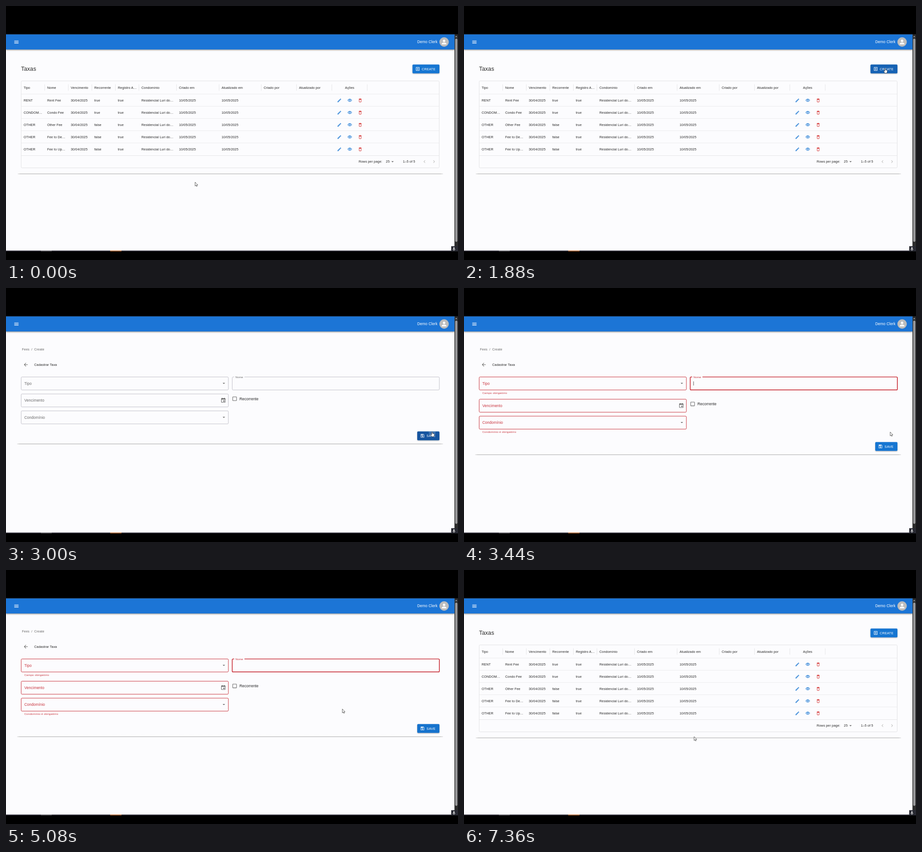
Recreate the animation shown at these times as an HTML page. Size 998 by 561 pixels, loop 7400 ms.

```html
<!DOCTYPE html>
<html lang="pt">
<head>
<meta charset="utf-8">
<title>Taxas</title>
<style>
html, body { margin: 0; width: 100%; height: 100%; overflow: hidden; background: #000; }
svg { display: block; }
text { font-family: "Liberation Sans", Arial, sans-serif; letter-spacing: .01em; white-space: pre; }
</style>
</head>
<body>
<svg id="stage" width="998" height="561" viewBox="0 0 998 561"></svg>
<script>
const LOOP = 7400, BLUE = '#1976d2', DARK = '#1559a8', RED = '#c9323b', INK = '#262626', GREY = '#696969';

const ICONS = {
  menu: 'M3 18h18v-2H3zm0-5h18v-2H3zm0-7v2h18V6z',
  person: 'M12 12a4 4 0 1 0 0-8 4 4 0 0 0 0 8zm0 2c-2.67 0-8 1.34-8 4v2h16v-2c0-2.66-5.33-4-8-4z',
  add: 'M19 3H5a2 2 0 0 0-2 2v14a2 2 0 0 0 2 2h14a2 2 0 0 0 2-2V5a2 2 0 0 0-2-2m0 16H5V5h14zm-8-2h2v-4h4v-2h-4V7h-2v4H7v2h4z',
  edit: 'm14.06 9.02.92.92L5.92 19H5v-.92zM17.66 3c-.25 0-.51.1-.7.29l-1.83 1.83 3.75 3.75 1.83-1.83c.39-.39.39-1.02 0-1.41l-2.34-2.34c-.2-.2-.45-.29-.71-.29m-3.6 3.19L3 17.25V21h3.75L17.81 9.94z',
  view: 'M12 6c3.79 0 7.17 2.13 8.82 5.5C19.17 14.87 15.79 17 12 17s-7.17-2.13-8.82-5.5C4.83 8.13 8.21 6 12 6m0-2C7 4 2.73 7.11 1 11.5 2.73 15.89 7 19 12 19s9.27-3.11 11-7.5C21.27 7.11 17 4 12 4m0 5a2.5 2.5 0 0 1 0 5 2.5 2.5 0 0 1 0-5m0-2a4.5 4.5 0 0 0 0 9 4.5 4.5 0 0 0 0-9',
  trash: 'M6 19c0 1.1.9 2 2 2h8c1.1 0 2-.9 2-2V7H6zM8 9h8v10H8zm7.5-5-1-1h-5l-1 1H5v2h14V4z',
  save: 'M17 3H5a2 2 0 0 0-2 2v14a2 2 0 0 0 2 2h14a2 2 0 0 0 2-2V7zm2 16H5V5h11.17L19 7.83zm-7-7a3 3 0 0 0 0 6 3 3 0 0 0 0-6M6 6h9v4H6z',
  event: 'M17 12h-5v5h5zM16 1v2H8V1H6v2H5a2 2 0 0 0-2 2v14a2 2 0 0 0 2 2h14a2 2 0 0 0 2-2V5a2 2 0 0 0-2-2h-1V1zm3 18H5V8h14z',
  box: 'M19 5v14H5V5h14m0-2H5a2 2 0 0 0-2 2v14a2 2 0 0 0 2 2h14a2 2 0 0 0 2-2V5a2 2 0 0 0-2-2z',
  back: 'M20 11H7.83l5.59-5.59L12 4l-8 8 8 8 1.41-1.41L7.83 13H20z',
  drop: 'M7 9.5l5 5 5-5z',
  left: 'M15.41 7.41 14 6l-6 6 6 6 1.41-1.41L10.83 12z',
  right: 'M10 6 8.59 7.41 13.17 12l-4.58 4.59L10 18l6-6z',
  mic: 'M12 14a3 3 0 0 0 3-3V5a3 3 0 0 0-6 0v6a3 3 0 0 0 3 3zm5-3a5 5 0 0 1-10 0H5a7 7 0 0 0 6 6.9V21h2v-3.1A7 7 0 0 0 19 11z'
};

const rect = (x, y, w, h, fill, extra = '') =>
  `<rect x="${x}" y="${y}" width="${w}" height="${h}" fill="${fill}" ${extra}/>`;
const line = (x1, y1, x2, y2, color) => `<path d="M${x1} ${y1}L${x2} ${y2}" stroke="${color}"/>`;
// Text is placed by the vertical middle of its capitals.
const text = (x, cy, str, size = 7.28, fill = INK, extra = '') =>
  `<text x="${x}" y="${cy + size * .36}" font-size="${size}" fill="${fill}" ${extra}>${str}</text>`;
const icon = (name, cx, cy, size, fill) =>
  `<path d="${ICONS[name]}" fill="${fill}" fill-rule="evenodd" transform="translate(${cx - size / 2} ${cy - size / 2}) scale(${size / 24})"/>`;

const button = (id, x, y, w, label, glyph) => `
  <clipPath id="${id}Clip"><rect x="${x}" y="${y}" width="${w}" height="19.5" rx="2"/></clipPath>
  ${rect(x, y, w, 19.5, BLUE, `id="${id}" rx="2" filter="url(#soft)"`)}
  ${icon(glyph, x + 11.5, y + 9.7, 10.4, '#fff')}
  ${text(x + 20.6, y + 9.7, label, 7.28, '#fff', 'style="letter-spacing:.029em"')}
  <circle id="${id}Ripple" fill="#fff" opacity="0" clip-path="url(#${id}Clip)"/>`;

const divider = (x, y) => rect(x, y, 965 - x, 1, 'url(#fade)');

function listPage() {
  const columns = [[39, 'Tipo'], [91, 'Nome'], [143, 'Vencimento'], [195, 'Recorrente'], [247, 'Registro A…'],
    [299, 'Condomínio'], [382, 'Criado em'], [476, 'Atualizado em'], [569, 'Criado por'], [647, 'Atualizado por'], [748.5, 'Ações']];
  const rows = [['RENT', 'Rent Fee', true], ['CONDOM…', 'Condo Fee', true], ['OTHER', 'Other Fee', false],
    ['OTHER', 'Fee to De…', false], ['OTHER', 'Fee to Up…', false]];
  const edges = [85.5, 137.5, 189.5, 241.5, 293.5, 376.5, 470.5, 563.5, 641.5, 719.5, 797.5];
  let out = text(33.3, 138.6, 'Taxas', 12.5) + button('create', 897.5, 129.3, 59.5, 'CREATE', 'add')
    + rect(33.5, 165.5, 923, 192, 'none', 'rx="2" stroke="#e3e3e5"');
  for (const [x, label] of columns) out += text(x, 180, label);
  for (const x of edges) out += line(x, 173, x, 187, '#e6e6e8');
  rows.forEach(([type, name, recurring], i) => {
    const y = 208.5 + 27 * i;
    const cells = [type, name, '30/04/2025', recurring, true, 'Residencial Luri do…', '10/05/2025', '10/05/2025'];
    out += line(34, y - 14, 956, y - 14, '#ececee');
    cells.forEach((cell, c) => out += text(columns[c][0], y, cell));
    out += icon('edit', 736, y, 10.4, BLUE) + icon('view', 759, y, 10.4, BLUE) + icon('trash', 782, y, 10.4, '#d32f2f');
  });
  return out + line(34, 330.5, 956, 330.5, '#e6e6e8')
    + text(778.7, 343.5, 'Rows per page:') + text(838.8, 343.5, '25') + icon('drop', 853.5, 344, 12.5, GREY)
    + text(876.6, 343.5, '1–5 of 5') + icon('left', 924, 343.7, 12.5, '#bdbdbd') + icon('right', 945, 343.7, 12.5, '#bdbdbd')
    + divider(26, 370.3);
}

function formPage(id, error) {
  const shift = error ? 11.6 : 0, tone = error ? RED : GREY, border = error ? RED : '#c1c0c8';
  const field = (y, label, glyph) => rect(33.5, y, 457.5, 28.7, 'none', `rx="2" stroke="${border}"`)
    + text(40.4, y + 14.4, label, 8.32, tone)
    + icon(glyph, glyph === 'drop' ? 481 : 479.8, y + 14.3, 12.5, '#666');
  const helper = (y, str) => text(40.4, y, str, 6.24, RED, 'style="letter-spacing:.033em"');
  return text(35.3, 135.7, 'Fees', 7.28, GREY) + text(56, 135.7, '/', 7.28, GREY) + text(62.3, 135.7, 'Create', 7.28, GREY)
    + (error ? '<circle id="backHover" cx="44" cy="169.3" r="9.8" fill="#e8e8ed"/>' : '')
    + icon('back', 43.8, 169.3, 12.5, '#666') + text(62.3, 169, 'Cadastrar Taxa')
    + field(196.5, 'Tipo', 'drop') + field(234 + shift, 'Vencimento', 'event') + field(271.4 + shift, 'Condomínio', 'drop')
    + rect(499.5, 196.5, 457.3, 28.7, 'none', `id="${id}Name" rx="2" stroke="${border}"`)
    + rect(504, 194.5, 22.5, 4, '#fcfcfe') + text(506.6, 196.3, 'Nome', 6.24, tone)
    + icon('box', 504.8, 244.6 + shift, 12.5, '#666') + text(515.5, 244.6 + shift, 'Recorrente', 8.32)
    + (error ? helper(231.7, 'Campo obrigatório') + helper(318, 'Condomínio é obrigatório')
      + rect(506.5, 206.3, .8, 9, INK, 'id="caret"') : '')
    + button(id + 'Save', 908, 316.7 + shift * 2.03, 49, 'SAVE', 'save')
    + divider(24.5, 343.9 + shift * 2.05);
}

const outlined = 'fill="#fff" stroke="#222" stroke-width=".7" stroke-linejoin="round"';
stage.innerHTML = `
  <defs>
    <filter id="soft" x="-10%" y="-20%" width="120%" height="160%"><feDropShadow dx="0" dy="1" stdDeviation=".9" flood-opacity=".35"/></filter>
    <filter id="barShadow" x="-2%" y="-10%" width="104%" height="140%"><feDropShadow dx="0" dy="1.3" stdDeviation="1.4" flood-opacity=".45"/></filter>
    <linearGradient id="fade"><stop stop-color="#a5a5a3" stop-opacity=".4"/><stop offset=".006" stop-color="#a5a5a3"/>
      <stop offset=".994" stop-color="#a5a5a3"/><stop offset="1" stop-color="#a5a5a3" stop-opacity=".4"/></linearGradient>
  </defs>
  ${rect(0, 62.5, 990.5, 478, '#fcfcfe')}
  ${rect(0, 62.5, 990.5, 33.5, '#1b74d6', 'filter="url(#barShadow)"')}
  ${rect(0, 0, 998, 62.5, '#000')}
  ${icon('menu', 23, 79.5, 12.5, '#fff')}
  ${text(908, 79.3, 'Demo Clerk', 8.32, '#fff')}
  <circle cx="967.3" cy="79.5" r="10.4" fill="#bdbdbd"/>${icon('person', 967.3, 79.5, 15.6, '#fff')}
  <g id="list">${listPage()}</g>
  <g id="blank">${formPage('blank', false)}</g>
  <g id="invalid">${formPage('invalid', true)}</g>
  ${rect(990.5, 62.5, 7.5, 478, '#2b2b2b')}
  ${rect(991.8, 72, 4.8, 449, '#9d9d9f', 'rx="2.4"')}
  <path d="M991.8 68.8l2.3-3 2.3 3z" fill="#9d9d9f"/>
  ${rect(0, 540.3, 998, 1.7, '#34323d')}
  ${rect(77, 540.3, 24, 1.5, '#77757a')}
  ${rect(230, 540.3, 25, 1.5, '#d9813f')}
  ${rect(983, 530.5, 15, 11.5, '#292a33')}
  ${icon('mic', 989, 537, 10, '#e8e8e8')}
  <g id="cursor">
    <path id="arrow" d="M0 0V8.6L2 6.8 3.3 9.6 4.6 9 3.3 6.3H6Z" ${outlined}/>
    <path id="hand" d="M-.9 6V.6Q0-.6.9.6V3.4L4 4.2Q4.9 4.5 4.8 5.5L4.2 8.2 3.4 10.3H-.6L-3.2 6.8Q-3.6 5.8-2.4 5.6Z" ${outlined}/>
    <path id="beam" d="M-2-4Q0-4 0-3Q0-4 2-4M0-3V3M-2 4Q0 4 0 3Q0 4 2 4" fill="none" stroke="#222" stroke-width=".9"/>
  </g>`;

const el = id => document.getElementById(id);
const show = (id, on) => el(id).style.display = on ? '' : 'none';
const clamp = v => Math.max(0, Math.min(1, v));

const OPEN_FORM = 2020, REJECT = 3120, LEAVE = 5720, RETURN = 6140;
const path = [[0, 417.5, 389], [600, 566.5, 379.5], [1300, 566.5, 379.5], [1800, 930, 138], [2080, 930, 138],
  [2400, 908, 220], [2820, 941, 318], [3880, 941, 318], [4140, 935, 345.5], [4840, 935, 345.5],
  [5640, 44.5, 167], [5740, 44.5, 167], [6060, 508, 368], [LOOP, 508, 368]];

function cursorAt(t) {
  const i = path.findIndex(p => p[0] > t), [t0, x0, y0] = path[i - 1], [t1, x1, y1] = path[i];
  const u = (t - t0) / (t1 - t0), k = u * u * (3 - 2 * u);
  return [x0 + (x1 - x0) * k, y0 + (y1 - y0) * k];
}

function cursorShape(page, x, y) {
  const over = (left, top, right, bottom) => x > left && x < right && y > top && y < bottom;
  if (page === 'list') return over(897, 129, 957, 149) ? 'hand' : 'arrow';
  const shift = page === 'invalid' ? 11.6 : 0;
  if (over(499, 196, 957, 225) || over(33, 234 + shift, 465, 263 + shift)) return 'beam';
  if (over(34, 159, 54, 179) || over(33, 196, 491, 225) || over(33, 271 + shift, 491, 300 + shift)
    || over(908, 317 + 2 * shift, 957, 336 + 2 * shift)) return 'hand';
  return 'arrow';
}

// Each button: id, pointer enters, press, pointer leaves, ripple centre.
const presses = [['create', 1760, 1880, 2120, 930, 138], ['blankSave', 2760, 2960, 3200, 941, 319],
  ['invalidSave', 4060, 4180, 4900, 935, 350]];

function mix(k) {
  const part = (a, b) => Math.round(a + (b - a) * k);
  return `rgb(${part(25, 18)},${part(118, 84)},${part(210, 160)})`;
}

function draw() {
  const t = Math.floor(performance.now() % LOOP / 40) * 40;
  const page = t < OPEN_FORM || t >= RETURN ? 'list' : t < REJECT ? 'blank' : 'invalid';
  for (const name of ['list', 'blank', 'invalid']) show(name, name === page);

  for (const [id, enter, press, leave, x, y] of presses) {
    el(id).setAttribute('fill', mix(clamp((t - enter) / 200) * clamp((leave + 200 - t) / 200)));
    const age = t - press, ripple = el(id + 'Ripple');
    ripple.setAttribute('cx', x);
    ripple.setAttribute('cy', y);
    ripple.setAttribute('r', 42 * (1 - (1 - clamp(age / 500)) ** 2.4));
    ripple.setAttribute('opacity', age < 0 ? 0 : .17 * clamp((600 - age) / 350));
  }

  const focused = t >= REJECT && t < LEAVE;
  el('invalidName').setAttribute('stroke-width', focused ? 1.7 : 1);
  show('caret', focused && (t - REJECT) % 1000 < 500);
  show('backHover', t >= 5600);

  const [x, y] = cursorAt(t), shape = cursorShape(page, x, y);
  el('cursor').setAttribute('transform', `translate(${x} ${y})`);
  for (const name of ['arrow', 'hand', 'beam']) show(name, name === shape);
  requestAnimationFrame(draw);
}
draw();
</script>
</body>
</html>
```
